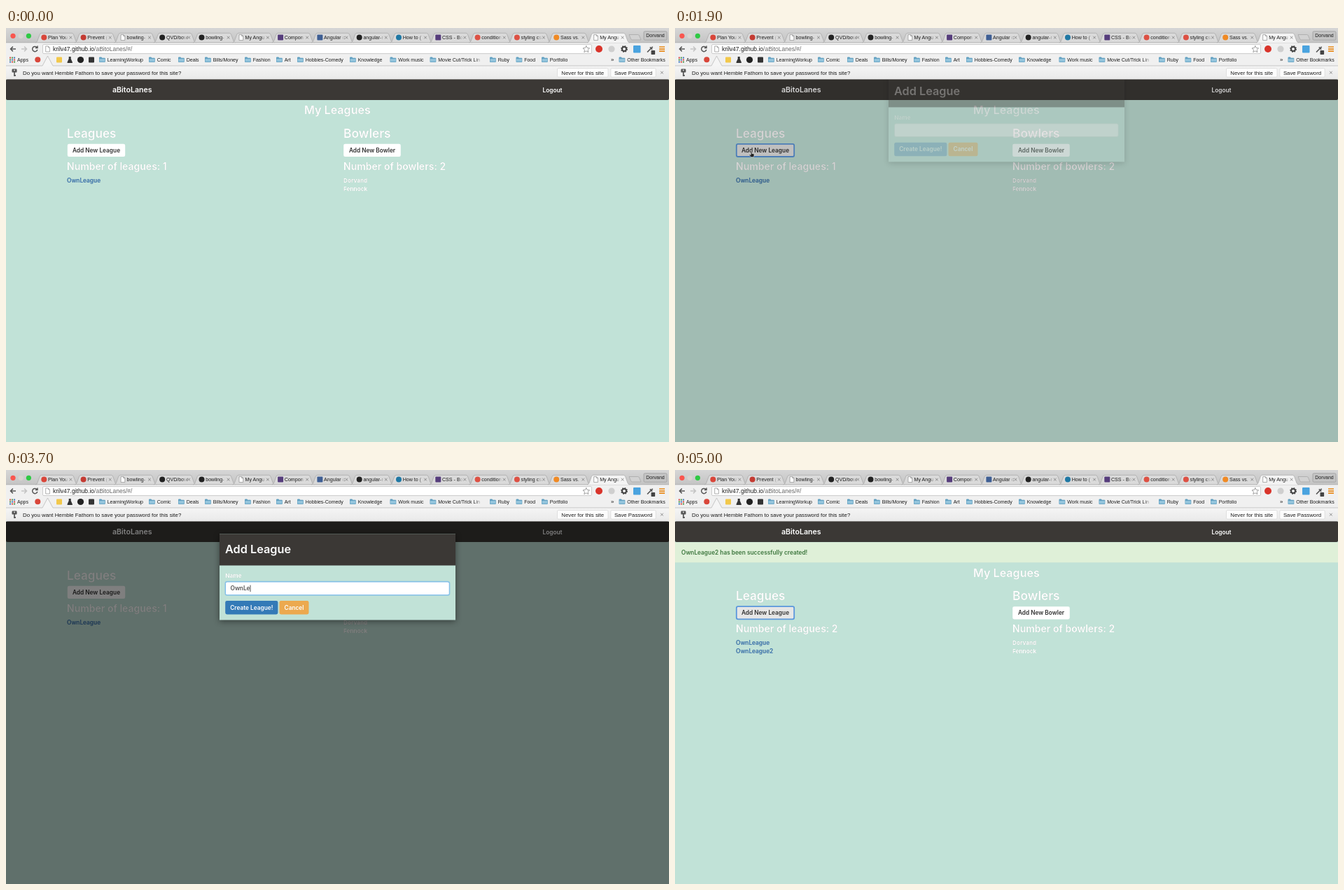
An HTML page for the animation above (5100 ms loop, 947 by 592 pixels).

```html
<!DOCTYPE html>
<html lang="en">
<head>
<meta charset="utf-8">
<title>League manager</title>
<style>
  html, body { margin: 0; width: 100%; height: 100%; overflow: hidden; background: #c1e2d7; }
  svg { display: block; width: 100%; height: 100%; }
  text { white-space: pre; }
  .ui { font: 7px "Liberation Sans", Arial, sans-serif; fill: #1c1c1c; }
  .page { font: 600 8.3px Inter, sans-serif; fill: #fff; }
  .page .dark { fill: #333; }
  .page .link { fill: #3f78b5; }
  .page .name { font-weight: 700; font-size: 8.2px; }
  .shade { filter: drop-shadow(.7px .7px .7px rgba(0, 0, 0, .26)); }
  #modal { filter: drop-shadow(0 2px 4px rgba(0, 0, 0, .45)); }
</style>
</head>
<body>
<svg id="stage" viewBox="0 0 947 592">
  <defs>
    <linearGradient id="frame" x2="0" y2="1"><stop stop-color="#d6d6d6"/><stop offset="1" stop-color="#c4c4c4"/></linearGradient>
    <linearGradient id="bar" x2="0" y2="1"><stop stop-color="#f5f5f5"/><stop offset="1" stop-color="#e9e9e9"/></linearGradient>
    <linearGradient id="fadeTab"><stop stop-color="#dadada" stop-opacity="0"/><stop offset="1" stop-color="#dadada"/></linearGradient>
    <linearGradient id="fadeActive"><stop stop-color="#f3f3f3" stop-opacity="0"/><stop offset="1" stop-color="#f3f3f3"/></linearGradient>
    <linearGradient id="fadeBar"><stop stop-color="#f0f0f0" stop-opacity="0"/><stop offset="1" stop-color="#f0f0f0"/></linearGradient>
    <g id="folder">
      <path d="M0 1.2q0-1 1-1h2.3l1 1.2h3.6q.9 0 .9.9v4.6q0 .8-.9.8H.9q-.9 0-.9-.8z" fill="#619fc0"/>
      <path d="M.6 2.7h7.6v4.2H.6z" fill="#93c4dc"/>
    </g>
    <path id="doc" d="M-2.8-4h3.7l2 2v6h-5.7zM.9-4v2h2" fill="#fff" stroke="#8d8d8d" stroke-width=".7"/>
  </defs>

  <rect width="947" height="592" fill="#c1e2d7"/>

  <g class="page">
    <rect y="73" width="947" height="30" rx="2" fill="#3b3835"/>
    <text x="152" y="92" style="font-size:10.6px">aBitoLanes</text>
    <text x="766.5" y="91.5">Logout</text>
    <g id="alert">
      <rect y="103.4" width="947" height="28.8" fill="#dff0d8"/>
      <text x="9" y="120.8" style="fill:#3c763d">OwnLeague2 has been successfully created!</text>
    </g>
    <g id="content">
      <g class="shade">
        <text x="473.5" y="123.2" text-anchor="middle" style="font-size:16.1px">My Leagues</text>
        <text x="87" y="156.6" style="font-size:17.1px">Leagues</text>
        <text x="482" y="156.6" style="font-size:17.4px">Bowlers</text>
        <text x="87" y="203" style="font-size:14px" id="count"></text>
        <text x="482" y="203" style="font-size:14px">Number of bowlers: 2</text>
      </g>
      <rect id="addLeague" x="87.8" y="165.8" width="82.4" height="18.2" rx="2.3"/>
      <text class="dark" x="129" y="178" text-anchor="middle">Add New League</text>
      <rect x="482.2" y="165.8" width="81.6" height="18.2" rx="2.3" fill="#fff"/>
      <text class="dark" x="523" y="178" text-anchor="middle">Add New Bowler</text>
      <g class="shade">
        <text class="link" x="87" y="221">OwnLeague</text>
        <text class="link" x="87" y="232.5" id="secondLink">OwnLeague2</text>
        <text class="name" x="482" y="221">Dorvand</text>
        <text class="name" x="482" y="232.5">Fennock</text>
      </g>
    </g>
  </g>

  <rect id="backdrop" y="74" width="947" height="518"/>

  <g id="modal" class="page">
    <rect x="305" y="91.5" width="337" height="123" fill="#c1e2d7"/>
    <rect x="305" y="91.5" width="337" height="45" fill="#3b3835"/>
    <text class="shade" x="313" y="119.4" style="font-size:16.3px">Add League</text>
    <text class="shade name" x="313.3" y="154.2">Name</text>
    <rect id="glow" x="312.4" y="158.8" width="322" height="21" rx="3.4" fill="#66afe9" opacity=".45"/>
    <rect id="field" x="313.5" y="160" width="319.7" height="18.7" rx="2.3" fill="#fff" stroke-width=".8"/>
    <text id="typed" x="320.5" y="172" style="fill:#555"></text>
    <path id="caret" d="M0 164.6v9.6" stroke="#222" stroke-width=".8"/>
    <g id="create">
      <rect x="313.2" y="187" width="75.2" height="19.5" rx="2.4" fill="#337ab7"/>
      <text x="350.8" y="199.6" text-anchor="middle">Create League!</text>
    </g>
    <rect x="390.5" y="187" width="42" height="19.5" rx="2.4" fill="#eca94f"/>
    <text x="411.5" y="199.6" text-anchor="middle">Cancel</text>
  </g>

  <g class="ui" id="browser">
    <rect width="947" height="21" fill="url(#frame)"/>
    <circle cx="10" cy="11.3" r="3.6" fill="#f9564f"/>
    <circle cx="21.2" cy="11.3" r="3.6" fill="#d9d4d0"/>
    <circle cx="32.4" cy="11.3" r="3.6" fill="#2fc944"/>
    <path d="M890 9.5h12.5q1.5 0 2 1.4l2.5 6.1h-12.5q-1.5 0-2-1.3z" fill="#d2d2d2" stroke="#a2a2a2" stroke-width=".7"/>
    <rect x="911" y="4.8" width="33" height="12.4" rx="1.5" fill="#c4c4c4" stroke="#999" stroke-width=".7"/>
    <text x="927.5" y="13.4" text-anchor="middle">Dorvand</text>
    <rect y="20.8" width="947" height="33.2" fill="#f0f0f0"/>
    <g id="tabs"></g>

    <g fill="none" stroke="#555" stroke-width="1.5">
      <path d="M14 30H6.7m3.2-3.4L6.5 30l3.4 3.4"/>
      <path d="M22 30h7.3m-3.2-3.4 3.4 3.4-3.4 3.4" stroke="#c4c4c4"/>
      <path d="M44.3 28a3.6 3.6 0 1 0 .5 3M45 25.6v3h-3"/>
    </g>
    <rect x="52.5" y="23.6" width="784" height="13" rx="1.5" fill="#fff" stroke="#b9b9b9" stroke-width=".7"/>
    <use href="#doc" x="59.5" y="30"/>
    <text x="67" y="33.2" style="font-size:8.5px">krilv47.github.io<tspan fill="#666">/aBitoLanes/#/</tspan></text>
    <path d="m828.8 25.4 1.4 3.1 3.4.4-2.5 2.3.7 3.4-3-1.7-3 1.7.7-3.4-2.5-2.3 3.4-.4z" fill="#fff" stroke="#888" stroke-width=".8"/>
    <circle cx="847" cy="30" r="5" fill="#d9342b"/>
    <circle cx="865" cy="30" r="4.6" fill="#cfcfcf"/>
    <circle cx="883" cy="30" r="3" fill="none" stroke="#444" stroke-width="2"/>
    <circle cx="883" cy="30" r="4.2" fill="none" stroke="#444" stroke-width="1.5" stroke-dasharray="1.7 1.6"/>
    <rect x="896" y="25" width="10.5" height="10.5" rx="1" fill="#4aa3df"/>
    <path d="m916 34.5 5.5-5.5m-1.6-1.6 3.2 3.2m-1.6-1.6 2.2-2.2" stroke="#555" stroke-width="1.7"/>
    <rect x="921.5" y="32" width="5.6" height="6" rx=".8" fill="#444"/>
    <path d="M933 27h8m-8 3.1h8m-8 3.1h8" stroke="#e88a1a" stroke-width="1.7"/>

    <g id="bookmarks"></g>
    <rect y="54" width="947" height="19.4" fill="url(#bar)"/>
    <path d="M0 54h52l7.5-14L67 54h880" fill="#f5f5f5" stroke="#b4b4b4" stroke-width=".7"/>
    <rect x="8.5" y="58.6" width="7" height="5" rx="1.2" fill="#555"/>
    <path d="M12 63v6m0-1.2h2" stroke="#555" stroke-width="1.7"/>
    <circle cx="12" cy="60.4" r=".9" fill="#eee"/>
    <text x="24" y="66.5" style="font-size:7.83px">Do you want Hemble Fathom to save your password for this site?</text>
    <g fill="#fcfcfc" stroke="#d0d0d0" stroke-width=".6">
      <rect x="787.5" y="57.5" width="72.5" height="12.6" rx="1.5"/>
      <rect x="863.8" y="57.5" width="64.4" height="12.6" rx="1.5"/>
    </g>
    <text x="823.7" y="66.5" text-anchor="middle" style="font-size:7.8px">Never for this site</text>
    <text x="896" y="66.5" text-anchor="middle" style="font-size:7.8px">Save Password</text>
    <path d="m935 61.8 3.8 3.8m0-3.8-3.8 3.8" stroke="#888" stroke-width=".9"/>
  </g>

  <g id="pointer">
    <path id="beam" d="M-2-4.6Q0-4.6 0-3 0-4.6 2-4.6M0-3V3.2M-2 4.8Q0 4.8 0 3.2 0 4.8 2 4.8M-1 1.2h2" fill="none" stroke="#222" stroke-width=".9"/>
    <path id="arrow" d="M0 0v9l2.1-1.9 1.4 3.2 1.4-.6-1.4-3.1h2.9z" fill="#111" stroke="#fff" stroke-width=".7"/>
    <path id="hand" d="M-.8-3.6q.8-1 1.6 0V-.6l2.6.6q.8.3.7 1.2L3.5 4.6H-.6L-3 1.6q0-1.1 1.1-.7l1.1.7z" fill="#222" stroke="#eee" stroke-width=".5"/>
  </g>
</svg>
<script>
const $ = id => document.getElementById(id);

function add(parent, tag, attrs, text = '') {
  const node = document.createElementNS('http://www.w3.org/2000/svg', tag);
  for (const name in attrs) node.setAttribute(name, attrs[name]);
  node.textContent = text;
  return parent.appendChild(node);
}
const dot = (parent, cx, cy, fill, r = 4) => add(parent, 'circle', { cx, cy, r, fill });
const box = (parent, cx, cy, fill) =>
  add(parent, 'rect', { x: cx - 4, y: cy - 4, width: 8, height: 8, rx: 1, fill });

const tabs = [
  ['Plan You', dot, '#d9463a'], ['Prevent (', dot, '#c43b32'], ['bowling-'],
  ['QVD/bow', dot, '#222'], ['bowling-', dot, '#222'], ['My Angu'],
  ['Compon', box, '#563d7c'], ['Angular c', box, '#3f5f94'], ['angular-r', dot, '#222'],
  ['How to (', dot, '#1f78a4'], ['CSS - Bo', box, '#563d7c'], ['condition', dot, '#dd5144'],
  ['styling cs', dot, '#dd5144'], ['Sass vs.', dot, '#f08a24'], ['My Angu'],
];
tabs.forEach(([title, icon, color], i) => {
  const active = i === tabs.length - 1;
  if (active) add($('tabs'), 'path', { d: 'M0 20.8H947', stroke: '#a8a8a8', 'stroke-width': .8 });
  const g = add($('tabs'), 'g', { transform: `translate(${42 + 56.3 * i})` });
  add(g, 'path', {
    d: 'M0 21Q2 20.6 2.8 18.6L6 9.6Q6.8 7.3 8.6 7.3H52Q53.8 7.3 54.6 9.6L57.8 18.6Q58.6 20.6 60.6 21',
    fill: active ? '#f3f3f3' : '#dadada', stroke: '#a5a5a5', 'stroke-width': .7,
  });
  if (icon) icon(g, 12.3, 13.6, color);
  else add(g, 'use', { href: '#doc', x: 12.3, y: 13.6 });
  add(g, 'text', { x: 18, y: 16.1, style: 'font-size:7.1px' }, title);
  add(g, 'rect', { x: 41, y: 8.5, width: 6, height: 11, fill: `url(#${active ? 'fadeActive' : 'fadeTab'})` });
  add(g, 'path', { d: 'm48.6 11.8 3.6 3.6m0-3.6-3.6 3.6', stroke: '#777', 'stroke-width': .8 });
});

const marks = $('bookmarks');
const gridColors = ['#d9574c', '#5a9e57', '#4f7fc4'];
for (let i = 0; i < 9; i++) {
  const column = i % 3, row = Math.floor(i / 3);
  add(marks, 'rect', { x: 5 + column * 3, y: 41.5 + row * 3, width: 2.1, height: 2.1, fill: gridColors[(column + row) % 3] });
}
add(marks, 'text', { x: 16, y: 48 }, 'Apps');
dot(marks, 45.3, 45.3, '#d9463a');
box(marks, 76, 45.5, '#f2c84b');
add(marks, 'path', { d: 'M89.7 41h3v3l2.2 5q.3 1-.7 1h-6q-1 0-.7-1l2.2-5z', fill: '#333' });
dot(marks, 106.5, 45.5, '#222', 4.6);
box(marks, 122, 45.5, '#333');
const folders = [
  [133, 'LearningWorkup'], [204, 'Comic'], [246, 'Deals'], [284, 'Bills/Money'], [341, 'Fashion'],
  [386, 'Art'], [416, 'Hobbies-Comedy'], [491, 'Knowledge'], [548.5, 'Work music'],
  [605.5, 'Movie Cut/Trick Lin'], [691, 'Ruby'], [728.5, 'Food'], [765, 'Portfolio'], [875.5, 'Other Bookmarks'],
];
for (const [x, label] of folders) {
  add(marks, 'use', { href: '#folder', x, y: 41.3 });
  add(marks, 'text', { x: x + 11.7, y: 48 }, label);
}
add(marks, 'rect', { x: 668, y: 40, width: 14, height: 12, fill: 'url(#fadeBar)' });
add(marks, 'text', { x: 864, y: 47.8, style: 'font-size:8px' }, '»');

const LOOP = 5100, STEP = 100;
const clamp = v => Math.min(1, Math.max(0, v));
const easeOut = p => 1 - (1 - clamp(p)) ** 1.6;
const show = (id, on) => $(id).setAttribute('visibility', on ? 'inherit' : 'hidden');

// time, x, y
const route = [
  [600, 113, 226], [1100, 121, 192], [1200, 121, 192], [1300, 121, 190.6], [1400, 121, 190.6],
  [1700, 109, 180], [2100, 109, 180], [2700, 338, 168], [3300, 338, 168],
];

function movePointer(t) {
  const next = route.findIndex(key => key[0] > t);
  show('pointer', next > 0);
  if (next < 1) return;
  const [t0, x0, y0] = route[next - 1], [t1, x1, y1] = route[next];
  const p = (t - t0) / (t1 - t0);
  $('pointer').setAttribute('transform', `translate(${x0 + (x1 - x0) * p} ${y0 + (y1 - y0) * p})`);
  const hand = t >= 1700 && t <= 2100;
  const arrow = t < 900 || (t > 2100 && t < 2700);
  show('hand', hand);
  show('arrow', arrow);
  show('beam', !hand && !arrow);
}

function render(t) {
  const created = t >= 4800, refreshed = t >= 5000;
  show('alert', created);
  $('content').setAttribute('transform', `translate(0 ${created ? 29.4 : 0})`);
  $('count').textContent = `Number of leagues: ${refreshed ? 2 : 1}`;
  show('secondLink', refreshed);

  const pressed = (t >= 1700 && t <= 2000) || created;
  const button = $('addLeague');
  button.setAttribute('fill', pressed ? '#e6e6e6' : '#fff');
  button.setAttribute('stroke', pressed ? '#5b97dc' : 'none');
  button.setAttribute('stroke-width', 1.8);

  const fade = clamp((t - 1850) / 150) * (1 - clamp((t - 4834) / 150));
  const raised = 1 - easeOut((t - 1850) / 300) + easeOut((t - 4860) / 300);
  $('backdrop').setAttribute('opacity', fade / 2);
  $('modal').setAttribute('opacity', fade);
  $('modal').setAttribute('transform', `translate(0 ${-31 * raised})`);

  const focused = t >= 3000;
  const letters = t < 3300 ? 0 : t < 4200 ? (t - 3200) / STEP : t < 4300 ? 9 : 10;
  show('glow', focused);
  $('field').setAttribute('stroke', focused ? '#66afe9' : '#d5dfdb');
  $('typed').textContent = 'OwnLeague2'.slice(0, letters);
  show('caret', focused && !created);
  $('caret').setAttribute('transform', `translate(${321 + (letters && $('typed').getComputedTextLength())})`);
  $('create').setAttribute('opacity', letters ? 1 : .65);

  movePointer(t);
}

const start = performance.now();
function tick() {
  const t = (performance.now() - start) % LOOP;
  render(Math.floor(t / STEP) * STEP);
  requestAnimationFrame(tick);
}
tick();
</script>
</body>
</html>
```
